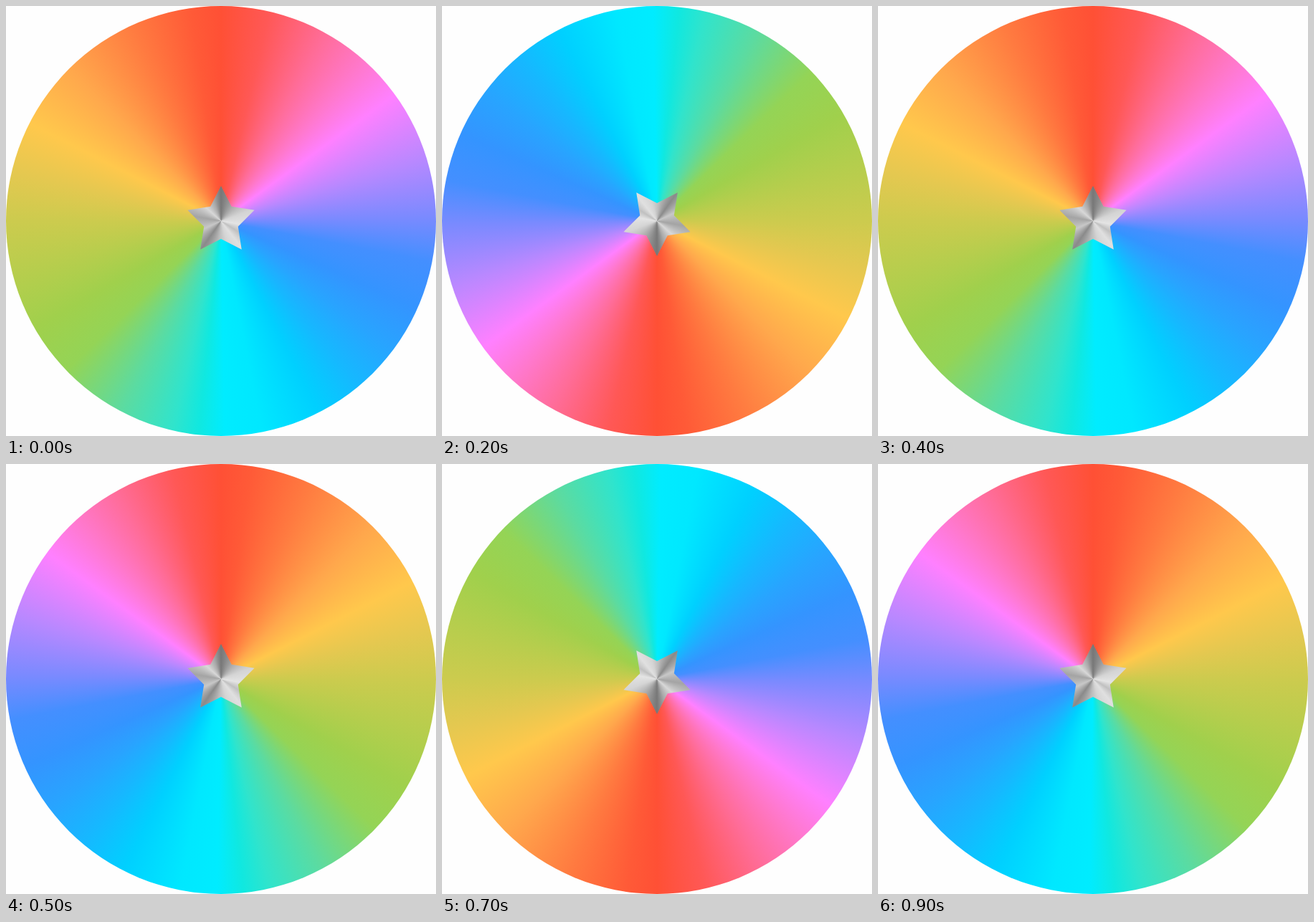
These frames come from a looping animation (600 px wide and 600 px high, 1000 ms). An HTML page:

```html
<!DOCTYPE html>
<html lang="en">
<head>
<meta charset="utf-8">
<title>Colour wheel</title>
<style>
  html, body { margin: 0; width: 100%; height: 100%; overflow: hidden; background: #fefefe; }
  #spin { position: absolute; left: 0; top: 0; width: 600px; height: 600px; }
  #wheel, #star { position: absolute; }
  #wheel {
    inset: 0;
    border-radius: 50%;
    background: conic-gradient(
      #ff5035, #ff5856 13deg, #ff6c98 29deg, #ff78cc 42deg, #ff80ff 54deg,
      #b888ff 73deg, #7a8aff 89deg, #448fff 101deg, #3494ff 114deg,
      #28a4ff 127deg, #16b8ff 140deg, #00d0ff 153deg, #00e8ff 169deg,
      #00ecff 179deg, #10e8e0 186deg, #30e4cc 193deg, #5cdba0 208deg,
      #94d456 226deg, #a0d04c 240deg, #cccb4e 270deg, #e4c850 283deg,
      #ffc84c 297deg, #ffa84c 315deg, #ff7a40 336deg, #ff5a37 352deg, #ff5035);
  }
  #star {
    left: 250px; top: 250px; width: 100px; height: 100px;
    background: conic-gradient(
      #777, #aaa 38deg, #d4d4d4 70deg, #e4e4e4 100deg, #c0c0c0 122deg,
      #e0e0e0 142deg, #d4d4d4 165deg, #bbb 186deg, #8a8a8a 215deg,
      #c8c8c8 245deg, #a4a4a4 280deg, #d8d8d8 312deg, #aaa 340deg, #777);
  }
</style>
</head>
<body>
<div id="spin"><div id="wheel"></div><div id="star"></div></div>
<script>
const spin = document.getElementById('spin');
const wheel = document.getElementById('wheel');
const star = document.getElementById('star');

const points = Array.from({ length: 10 }, (_, i) => {
  const r = i % 2 ? 25 : 49;
  const a = i * Math.PI / 5;
  return `${50 + r * Math.sin(a)}px ${50 - r * Math.cos(a)}px`;
});
star.style.clipPath = `polygon(${points})`;

// Quarter turns to the left; the colour order flips after each full turn.
function draw(now) {
  const step = Math.floor(now % 1000 / 100);
  spin.style.transform = `rotate(${-90 * (step % 5)}deg)`;
  wheel.style.transform = `scaleX(${step < 5 ? 1 : -1})`;
}

let start;
function tick(now) {
  start ??= now;
  draw(now - start);
  requestAnimationFrame(tick);
}
draw(0);
requestAnimationFrame(tick);
</script>
</body>
</html>
```
